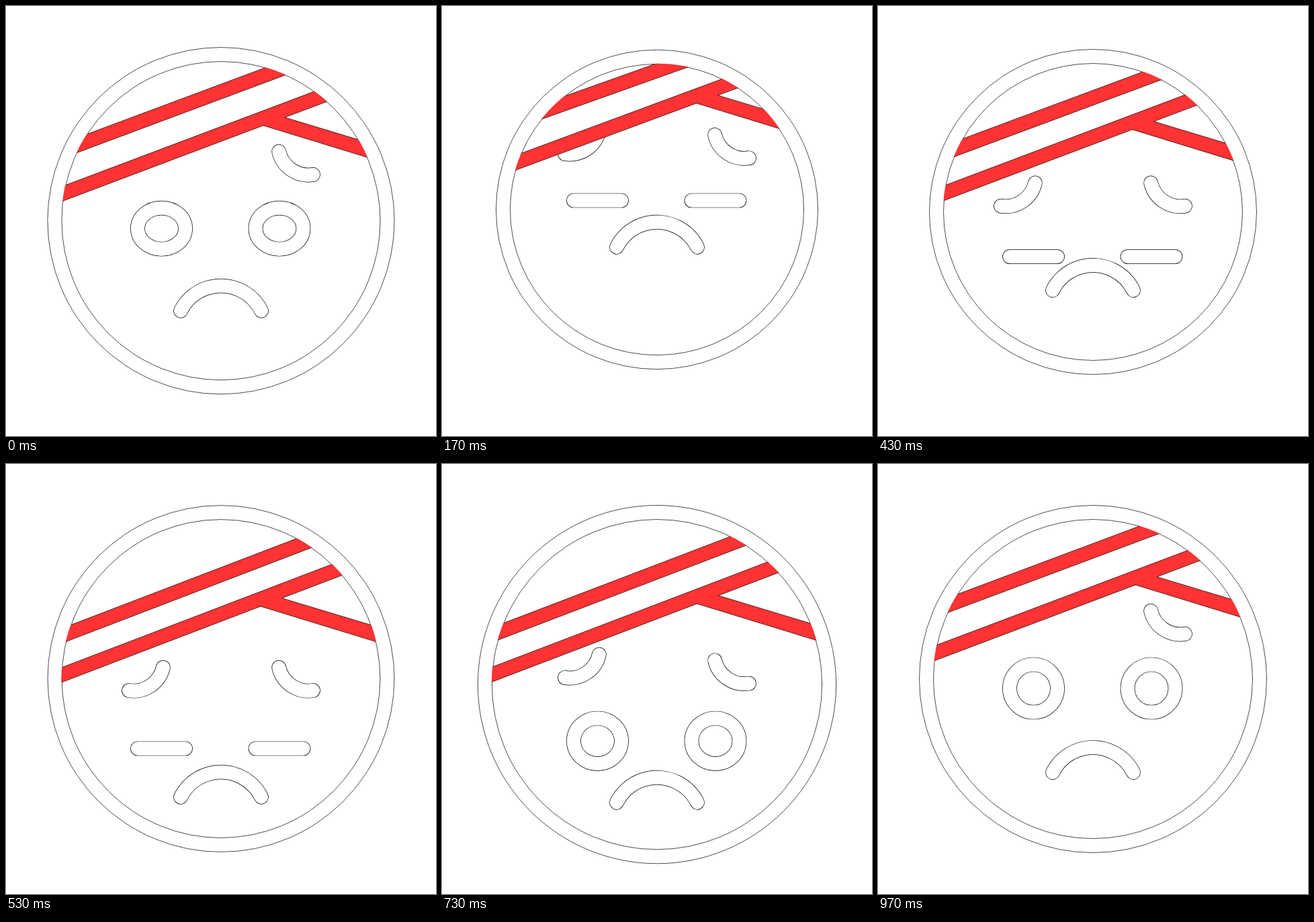
Animation of 640 by 640 pixels, one loop 1670 ms. Source, as an HTML page with a canvas:

```html
<!DOCTYPE html>
<html lang="en">
<head>
<meta charset="utf-8">
<title>Bandaged face</title>
<style>
  html, body { margin: 0; width: 100%; height: 100%; overflow: hidden; background: #fff; }
  canvas { display: block; width: 640px; height: 640px; }
</style>
</head>
<body>
<canvas id="stage" width="640" height="640"></canvas>
<script>
const g = document.getElementById('stage').getContext('2d');
const LOOP = 1670, STEP = 100 / 3, LAST = 29;
const RED = '#ff3333', BAND = 22.2, HAIR = 0.7;

// Eased value along time/value pairs: t0, v0, t1, v1, ...
function track(t, ...k) {
  if (t <= k[0]) return k[1];
  for (let i = 2; i < k.length; i += 2) {
    if (t < k[i]) {
      const x = (t - k[i - 2]) / (k[i] - k[i - 2]);
      return k[i - 1] + (k[i + 1] - k[i - 1]) * (1 - Math.cos(Math.PI * x)) / 2;
    }
  }
  return k[k.length - 1];
}

// Nod: rest -> up -> down -> rest
function nod(t, rest, up, down, upEnd = 237, downEnd = 539) {
  return track(t, -40, rest, upEnd, up, 290, up, downEnd, down, 670, down, 945, rest);
}

// Outline of a thick round stroke
function tube(path) {
  g.lineCap = g.lineJoin = 'round';
  for (const [color, width] of [['#000', 21 + HAIR], ['#fff', 21 - HAIR]]) {
    g.beginPath();
    path();
    g.strokeStyle = color;
    g.lineWidth = width;
    g.stroke();
  }
}

function eye(x, y, ry) {
  tube(() => {
    if (ry < 0.5) {
      g.moveTo(x - 35.5, y);
      g.lineTo(x + 35.5, y);
    } else {
      g.ellipse(x, y, 35.5, ry, 0, 0, 7);
    }
  });
}

function brow(y, side) {
  const a = 2.915, b = 1.414;
  tube(() => side > 0
    ? g.arc(450, y, 45, a, b, true)
    : g.arc(190, y, 45, Math.PI - a, Math.PI - b));
}

function oval(y, rx, ry) {
  g.beginPath();
  g.ellipse(320, y, rx, ry, 0, 0, 7);
}

function poly(color, ...p) {
  g.beginPath();
  for (let i = 0; i < p.length; i += 2) g.lineTo(p[i], p[i + 1]);
  g.fillStyle = color;
  g.fill();
}

function edge(x1, y1, x2, y2) {
  g.beginPath();
  g.moveTo(x1, y1);
  g.lineTo(x2, y2);
  g.stroke();
}

function draw(t) {
  g.fillStyle = '#fff';
  g.fillRect(0, 0, 640, 640);

  // Face
  const eyeY = nod(t, 334, 285, 423.5, 217, 534);
  const eyeR = track(t, -40, 35.5, 125, 0, 540, 0, 765, 35.5);
  eye(231.5, eyeY, eyeR);
  eye(407, eyeY, eyeR);

  const browY = nod(t, 208.5, 181, 292.7, 192, 531);
  const lift = track(t, -40, 23.5, 275, 0, 550, 0, 994, 23.5);
  brow(browY, 1);
  brow(browY - lift, -1);

  const mouthY = track(t, -39, 411.5, 252, 286.5, 283, 286.5, 575, 456.5, 721, 456.5, 966, 411.5);
  tube(() => g.arc(320, mouthY + 77.6, 67.1, -2.678, -0.464));

  // Bandage lines
  const vx = nod(t, 383.3, 378, 379);
  const vy = nod(t, 180, 138.5, 212);
  const m = nod(t, 0.377, 0.369, 0.382);
  const upY = nod(t, 162.9, 122.7, 199.2);
  const upM = nod(t, 0.374, 0.353, 0.383);
  const low = x => vy - m * (x - vx);
  const up = x => upY - upM * (x - 260);
  poly('#fff', 150, low(150), 270, low(270), 270, up(270), 150, up(150));

  // Head
  const rx = track(t, -24, 258.5, 280, 231.2, 674, 268.5, 882, 258.5);
  const d = rx - 258.5, squash = d < 0 ? 0.1 * d : 0;
  const cy = 320 + d - squash, ry = 258.5 + d + squash;
  g.strokeStyle = '#000';
  g.lineWidth = HAIR;
  oval(cy, rx, ry);
  g.stroke();
  oval(cy, rx - 21, ry - 21);
  g.stroke();

  // Bandage
  g.save();
  oval(cy, rx - 20.4, ry - 20.4);
  g.clip();
  const nx = vx + 32, ny = low(nx);
  const farV = vy + 0.307 * (640 - vx), farN = ny + 0.302 * (640 - nx);
  for (const line of [up, low]) {
    poly(RED, 0, line(0), 640, line(640), 640, line(640) - BAND, 0, line(0) - BAND);
  }
  poly(RED, vx, vy, vx, vy - 9, nx, ny - 9, nx, ny, 640, farN, 640, farV);

  oval(cy, rx - 21, ry - 21);
  g.clip();
  edge(0, up(0), 640, up(640));
  for (const line of [up, low]) edge(0, line(0) - BAND, 640, line(640) - BAND);
  edge(0, low(0), vx, vy);
  edge(vx, vy, 640, farV);
  edge(nx, ny, 640, low(640));
  edge(nx, ny, 640, farN);
  g.restore();
}

const start = performance.now();

// The motion advances 30 steps a second, then rests
function tick() {
  const t = (performance.now() - start) % LOOP;
  draw(Math.min(LAST, Math.floor((t + 3.4) / STEP)) * STEP);
  requestAnimationFrame(tick);
}
tick();
</script>
</body>
</html>
```
